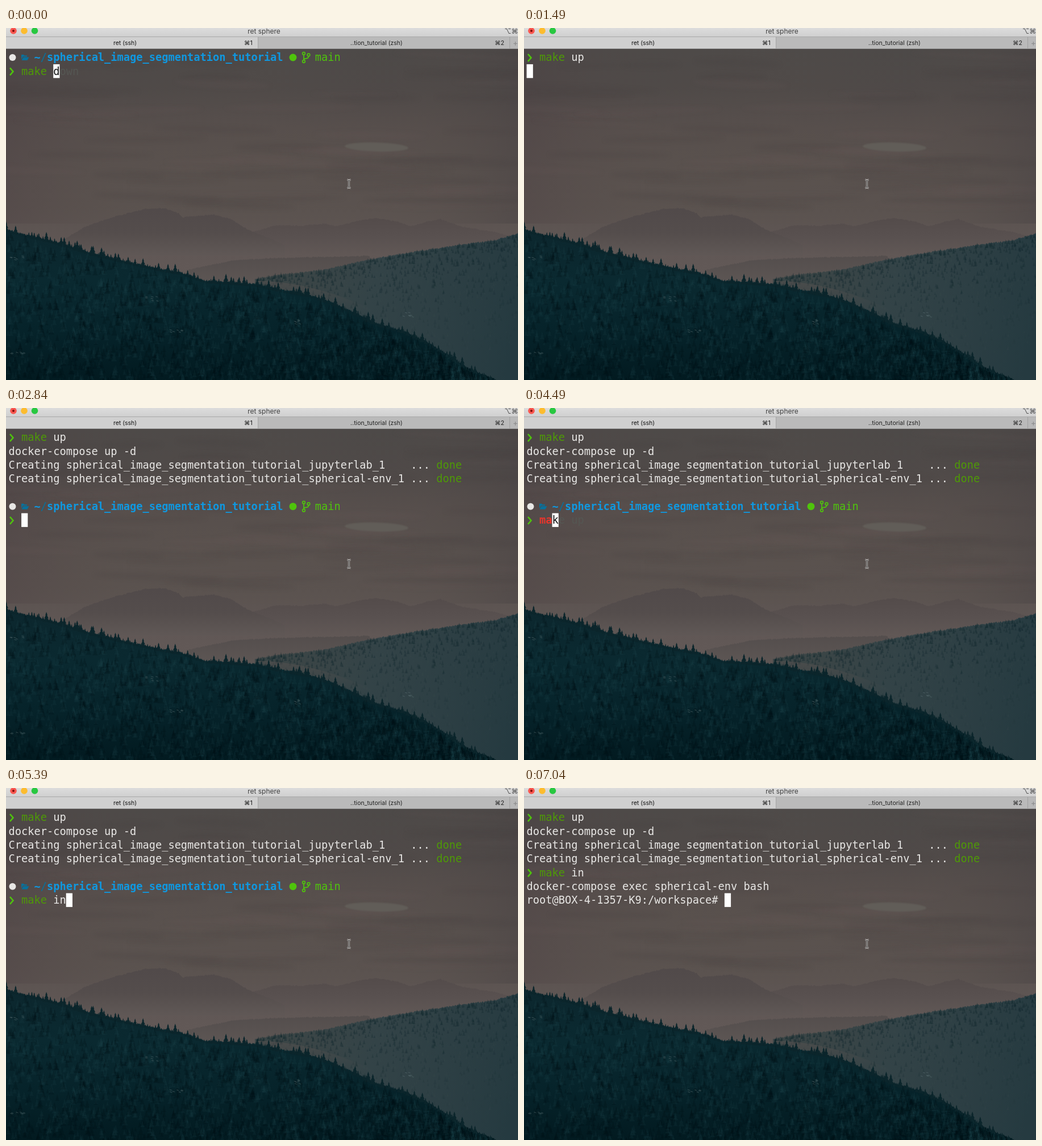
Recreate the animation shown at these times as an HTML page with a canvas. Size 901 by 621 pixels, loop 8 s.

```html
<!DOCTYPE html>
<html lang="en">
<head>
<meta charset="utf-8">
<title>Terminal</title>
<style>
  html, body { margin: 0; width: 100%; height: 100%; overflow: hidden; background: #4c4847; }
  canvas { display: block; }
</style>
</head>
<body>
<canvas id="stage" width="901" height="621"></canvas>
<script>
const W = 901, H = 621, LOOP = 8000;
const CELL = 11.234, LINE = 24.33, LEFT = 4.6, TOP = 39.6;
const MONO = '18.66px "DejaVu Sans Mono", monospace';
const UI = 'Inter, "DejaVu Sans", sans-serif';
const WHITE = '#e8e7e5', GREEN = '#4e9a06', LIME = '#4fc40c', RED = '#e8352c',
      GHOST = '#555753', BLUE = '#0f98e0', TEAL = '#08719c';

const stage = document.getElementById('stage').getContext('2d');
const scenery = document.createElement('canvas');
scenery.width = W;
scenery.height = H;

let seed = 7;
function random() {
  seed = (seed * 16807) % 2147483647;
  return seed / 2147483647;
}

// ---------- Scenery ----------

function gradient(c, x0, y0, x1, y1, ...stops) {
  const g = c.createLinearGradient(x0, y0, x1, y1);
  stops.forEach((color, i) => g.addColorStop(i / (stops.length - 1), color));
  return g;
}

function heightAt(points, x) {
  let i = 1;
  while (i < points.length - 1 && points[i][0] < x) i++;
  const [x0, y0] = points[i - 1], [x1, y1] = points[i];
  return y0 + (y1 - y0) * (x - x0) / (x1 - x0);
}

function ridge(c, points, bottom, fill, roughness) {
  const first = points[0][0], last = points[points.length - 1][0];
  c.fillStyle = fill;
  c.beginPath();
  c.moveTo(first, bottom);
  for (let x = first; x <= last; x++) c.lineTo(x, heightAt(points, x) - random() * roughness);
  c.lineTo(last, bottom);
  c.fill();
}

function tree(c, x, y, h) {
  c.beginPath();
  c.moveTo(x, y - h);
  for (let i = 1; i <= 3; i++) {
    c.lineTo(x + h * .11 * i, y - h + h * i / 3);
    if (i < 3) c.lineTo(x + h * .06 * i, y - h + h * i / 3);
  }
  for (let i = 3; i >= 1; i--) {
    if (i < 3) c.lineTo(x - h * .06 * i, y - h + h * i / 3);
    c.lineTo(x - h * .11 * i, y - h + h * i / 3);
  }
  c.fill();
}

function ellipse(c, x, y, rx, ry, fill, angle = 0) {
  c.fillStyle = fill;
  c.beginPath();
  c.ellipse(x, y, rx, ry, angle, 0, Math.PI * 2);
  c.fill();
}

function paintSky(c) {
  c.fillStyle = gradient(c, 0, 37, 0, 457, '#4b4847', '#4d4847', '#564e4c', '#59514e', '#5a524f', '#605755', '#635a58');
  c.fillRect(0, 0, W, H);
  c.fillStyle = gradient(c, 0, 0, W, 0, 'rgba(78,66,68,.4)', 'rgba(92,84,78,.15)', 'rgba(92,84,78,.2)', 'rgba(92,84,78,.1)', 'rgba(74,68,68,.5)');
  c.fillRect(0, 0, W, 345);
  c.filter = 'blur(3px)';
  for (let i = 0; i < 50; i++) {
    const tone = random() < .5 ? 'rgba(68,63,63,.16)' : 'rgba(108,92,88,.12)';
    ellipse(c, random() * W, 45 + random() * 270, 50 + random() * 110, 2 + random() * 6, tone, (random() - .4) * .08);
  }
  c.filter = 'blur(1px)';
  ellipse(c, 652, 210, 56, 8, '#615d58', .03);
  c.filter = 'none';
}

function paintFarHills(c) {
  ridge(c, [[430, 362], [475, 349], [520, 350], [560, 346], [582, 351], [620, 341], [650, 336], [690, 343],
    [712, 351], [740, 343], [764, 338], [800, 351], [860, 361], [901, 372]], 402,
    gradient(c, 0, 338, 0, 402, '#544c4b', '#595150', '#615856'), 2);
  ridge(c, [[100, 375], [140, 351], [190, 334], [245, 320], [280, 319], [304, 328], [310, 335], [365, 330],
    [395, 338], [430, 359], [470, 374], [490, 384]], 402,
    gradient(c, 0, 320, 0, 402, '#514a4a', '#544d4c', '#605856'), 2);
  ridge(c, [[318, 428], [400, 411], [470, 407], [640, 403]], 450,
    gradient(c, 0, 404, 0, 450, '#544e4d', '#5d5654'), 2);
}

function paintRightSlope(c) {
  const slope = [[438, 444], [480, 437], [560, 428], [640, 410], [720, 396], [800, 384], [860, 376], [901, 364]];
  ridge(c, slope, H, gradient(c, 520, 440, 901, 520, '#3b4546', '#334347', '#2d3f44', '#253a40'), 3);
  for (let i = 0; i < 1500; i++) {
    const x = 440 + random() * 461, depth = random() ** 2;
    c.fillStyle = random() < .65 ? `rgba(18,40,46,${.4 * (1 - depth)})` : 'rgba(65,83,86,.12)';
    tree(c, x, heightAt(slope, x) + 3 + depth * 190, 4 + random() * 5);
  }
  c.fillStyle = gradient(c, 0, 440, 0, 500, 'rgba(90,83,81,.6)', 'rgba(70,75,76,0)');
  c.beginPath();
  c.moveTo(438, 446);
  c.quadraticCurveTo(540, 446, 650, 500);
  c.lineTo(590, 500);
  c.fill();
}

function paintForest(c) {
  const edge = [[0, 356], [30, 365], [75, 375], [110, 385], [150, 398], [200, 410], [265, 425], [310, 433],
    [350, 447], [400, 450], [440, 453], [480, 462], [530, 471], [570, 484], [610, 502], [650, 522],
    [700, 536], [740, 555], [770, 573], [810, 600], [862, 622]];
  ridge(c, edge, H, gradient(c, 0, 360, 0, H, '#0c272e', '#0a2930', '#06232a', '#021a20'), 3);
  c.fillStyle = '#0b252b';
  for (let x = 0; x < 860; x += 2 + random() * 4) tree(c, x, heightAt(edge, x) + 3, 6 + random() ** 3 * 13);
  for (let i = 0; i < 3200; i++) {
    const x = random() * 850, top = heightAt(edge, x) + 12;
    const y = top + random() * (H + 10 - top);
    c.fillStyle = random() < .5 ? 'rgba(35,72,79,.15)' : 'rgba(0,12,18,.22)';
    tree(c, x, y, 7 + random() * 10);
  }
  for (const [x, y] of [[300, 536], [20, 576], [508, 518], [20, 406], [255, 478], [708, 506]])
    for (let i = 0; i < 7; i++)
      ellipse(c, x + (random() - .5) * 24, y + (random() - .5) * 8, 2.5, .7, 'rgba(100,121,122,.4)', .3);
}

// ---------- Window frame ----------

function label(c, text, x, y, size, color, align = 'center') {
  c.font = `${size}px ${UI}`;
  c.fillStyle = color;
  c.textAlign = align;
  c.fillText(text, x, y);
}

function rect(c, x, y, w, h, fill) {
  c.fillStyle = fill;
  c.fillRect(x, y, w, h);
}

function paintWindow(c) {
  rect(c, 0, 0, W, 15, gradient(c, 0, 0, 0, 15, '#dcdcdc', '#d0d0d0'));
  rect(c, 0, 15, W, 1, '#a9a9a9');
  rect(c, 0, 16, 443, 21, '#d0d0d0');
  rect(c, 443, 16, 444, 21, '#bababa');
  rect(c, 887, 16, 14, 21, '#b8b8b8');
  rect(c, 443, 16, 1, 21, '#a6a6a6');
  rect(c, 886, 16, 1, 21, '#a0a0a0');
  rect(c, 0, 36, W, 1, '#999');
  ellipse(c, 13, 5, 5.8, 5.8, '#f9564f');
  ellipse(c, 13, 5, 2, 2, '#7d0d08');
  ellipse(c, 32, 5, 5.8, 5.8, '#fdbc2e');
  ellipse(c, 50.5, 5, 5.8, 5.8, '#28c840');
  label(c, 'ret sphere', 454, 9.5, 12, '#404040');
  label(c, '⌥⌘1', 877, 9.5, 12, '#505050', 'left');
  label(c, 'ret (ssh)', 209.5, 30, 10.5, '#111');
  label(c, '⌘1', 426.5, 30, 10.5, '#111');
  label(c, '..tion_tutorial (zsh)', 652, 30, 10.5, '#222');
  label(c, '⌘2', 868.5, 30, 10.5, '#222');
  label(c, '+', 896.5, 31, 14, '#8a8a8a');
}

function paintPointer(c) {
  for (const [color, width] of [['#d5d2d0', 2.6], ['#282625', 1]]) {
    c.strokeStyle = color;
    c.lineWidth = width;
    c.beginPath();
    c.moveTo(600.5, 267.5);
    c.quadraticCurveTo(603.5, 268, 603.5, 271);
    c.lineTo(603.5, 279);
    c.quadraticCurveTo(603.5, 282, 600.5, 282.5);
    c.moveTo(606.5, 267.5);
    c.quadraticCurveTo(603.5, 268, 603.5, 271);
    c.moveTo(603.5, 279);
    c.quadraticCurveTo(603.5, 282, 606.5, 282.5);
    c.stroke();
  }
}

// ---------- Terminal content ----------

// A row is a list of runs: [text, color, bold, underlined].
const PROJECT = 'spherical_image_segmentation_tutorial';
const PATH = [['    '], ['~', BLUE, true], ['/', TEAL], [PROJECT, BLUE, true], ['     '], ['main', LIME]];
const input = (...runs) => [['❯ ', LIME], ...runs];
const MAKE = ['make', GREEN];
const plain = text => [[text, WHITE]];
const creating = text => `Creating ${PROJECT}_${text}`;

const started = [input(MAKE, [' up', WHITE]), plain('docker-compose up -d')];
const done = [
  ...started,
  [[creating('jupyterlab_1    ... '), WHITE], ['done', GREEN]],
  [[creating('spherical-env_1 ... '), WHITE], ['done', GREEN]],
];
const entered = [...done, input(MAKE, [' in', WHITE]), plain('docker-compose exec spherical-env bash')];
const typing = (...runs) => [...done, [], PATH, input(...runs)];

// Each screen: start time, rows, cursor column, cursor row, character under the cursor.
const screens = [
  [0, [PATH, input(MAKE, ['  '], ['own', GHOST])], 7, 1, 'd'],
  [450, [PATH, input(MAKE, [' '], ['u', WHITE, false, true])], 8, 1, 'p'],
  [590, [PATH, input(MAKE, [' up', WHITE])], 9, 1],
  [1490, started.slice(0, 1), 0, 1],
  [1640, started, 0, 2],
  [2090, [...started, plain(creating('jupyterlab_1 ...')), plain(creating('spherical-env_1 ...'))], 0, 4],
  [2840, typing(), 2, 6],
  [4490, typing(['ma', RED, true], [' '], ['e up', GHOST]), 4, 6, 'k'],
  [4640, typing(['mak', RED, true], [' '], [' up', GHOST]), 5, 6, 'e'],
  [4790, typing(MAKE, [' '], ['up', GHOST]), 6, 6],
  [4940, typing(MAKE, ['  '], ['p', GHOST]), 7, 6, 'u'],
  [5240, typing(MAKE, [' '], ['i', WHITE, false, true]), 8, 6, 'n'],
  [5390, typing(MAKE, [' in', WHITE]), 9, 6],
  [6140, entered, 0, 6],
  [7040, [...entered, plain('root@BOX-4-1357-K9:/workspace# ')], 31, 6],
];

function drawChevron(c, y) {
  c.strokeStyle = LIME;
  c.lineWidth = 2.6;
  c.beginPath();
  c.moveTo(7, y - 6.5);
  c.lineTo(12.5, y);
  c.lineTo(7, y + 6.5);
  c.stroke();
}

function drawPathIcons(c, y) {
  ellipse(c, 11.5, y, 6, 6, WHITE);
  ellipse(c, 505, y, 6.5, 6.5, LIME);
  c.fillStyle = TEAL;
  c.fill(new Path2D(`M27 ${y - 5}h4l1.5 1.5h4.5v2h-7l-3 5z M30.5 ${y - .5}h10l-3 5.5h-10z`));
  c.strokeStyle = LIME;
  c.lineWidth = 1.7;
  c.beginPath();
  for (const [x, dy] of [[524, -7], [524, 7], [532.5, -4.5]]) {
    c.moveTo(x + 2.3, y + dy);
    c.arc(x, y + dy, 2.3, 0, Math.PI * 2);
  }
  c.moveTo(524, y - 4.7);
  c.lineTo(524, y + 4.7);
  c.moveTo(532.5, y - 2.2);
  c.quadraticCurveTo(532.5, y + 1.5, 528, y + 1.8);
  c.quadraticCurveTo(524, y + 2, 524, y + 4.7);
  c.stroke();
}

function drawText(c, text, col, row, color, bold) {
  c.font = (bold ? 'bold ' : '') + MONO;
  c.fillStyle = color;
  c.textAlign = 'left';
  c.fillText(text, LEFT + col * CELL, TOP + row * LINE + 18.6);
}

function drawRow(c, runs, row) {
  const middle = TOP + row * LINE + 12.4;
  if (runs === PATH) drawPathIcons(c, middle);
  let col = 0;
  for (const [text, color, bold, underlined] of runs) {
    if (text[0] === '❯') drawChevron(c, middle + .5);
    else if (color) drawText(c, text, col, row, color, bold);
    if (underlined) rect(c, LEFT + col * CELL, TOP + row * LINE + 20.5, text.length * CELL, 1.2, color);
    col += text.length;
  }
}

function render(now) {
  const t = now % LOOP;
  const [, rows, col, row, under] = screens.filter(screen => screen[0] <= t).pop();
  stage.drawImage(scenery, 0, 0);
  rows.forEach((runs, i) => drawRow(stage, runs, i));
  rect(stage, LEFT + col * CELL, TOP + row * LINE, CELL, LINE, '#fff');
  if (under) drawText(stage, under, col, row, '#111');
}

for (const paint of [paintSky, paintFarHills, paintRightSlope, paintForest, paintWindow, paintPointer])
  paint(scenery.getContext('2d'));

const start = performance.now();
function tick() {
  render(performance.now() - start);
  requestAnimationFrame(tick);
}
tick();
</script>
</body>
</html>
```
